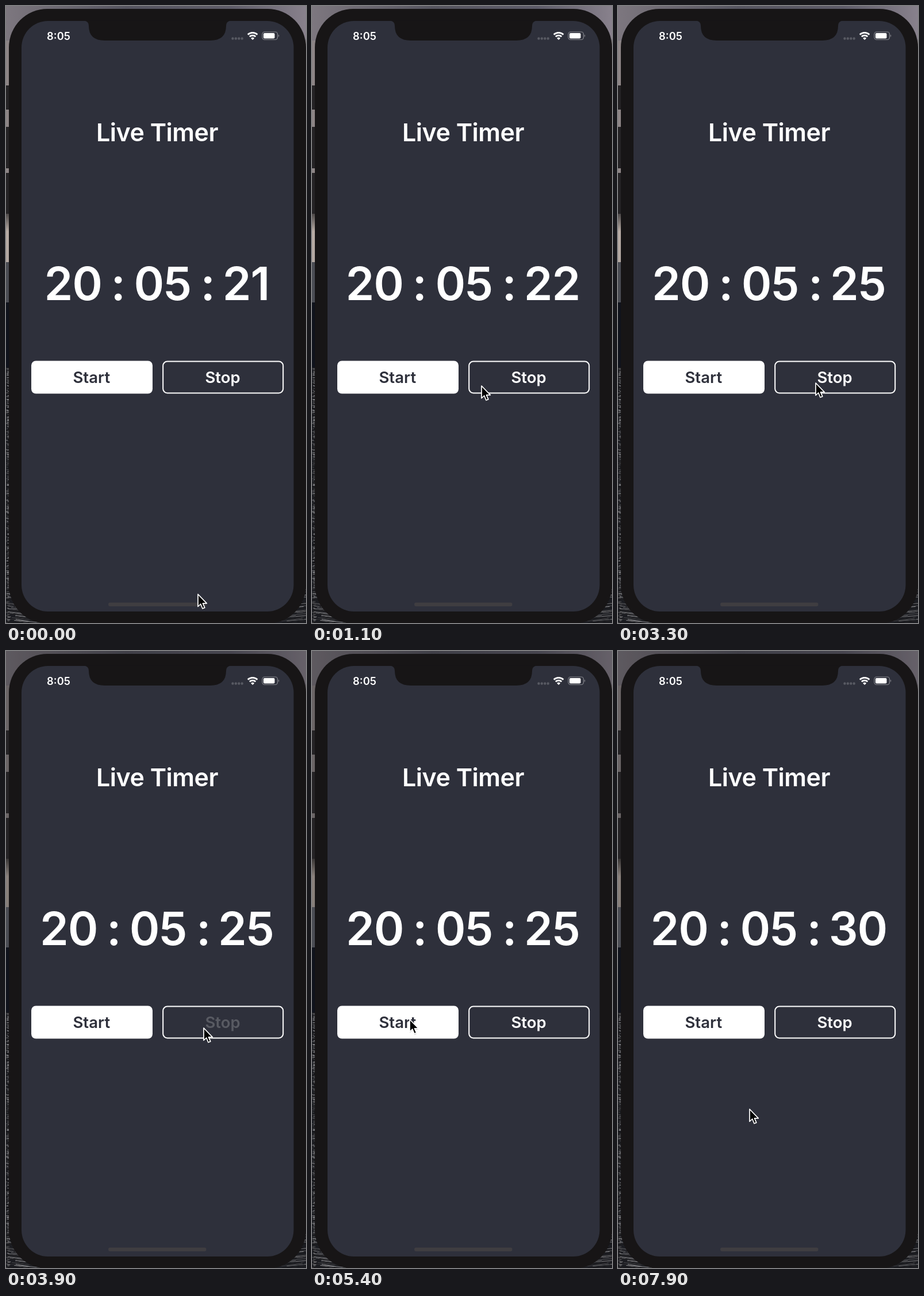
These frames come from a looping animation (522 by 1072 pixels, 8000 ms). An HTML page:

```html
<!DOCTYPE html>
<html lang="en">
<head>
<meta charset="utf-8">
<title>Live Timer</title>
<style>
  html, body { margin: 0; width: 100%; height: 100%; overflow: hidden; background: #171516; }
  svg { display: block; width: 522px; height: 1072px; }
  text { font-family: Inter, "Open Sans", sans-serif; font-weight: 600; fill: #fff; text-anchor: middle; }
</style>
</head>
<body>
<svg viewBox="0 0 522 1072">
  <defs>
    <linearGradient id="wall" x2="0" y2="1">
      <stop offset="0" stop-color="#7d777f"/>
      <stop offset=".15" stop-color="#8d8586"/>
      <stop offset=".8" stop-color="#8d8586"/>
      <stop offset=".81" stop-color="#4a4646"/>
      <stop offset=".88" stop-color="#b8aca5"/>
      <stop offset="1" stop-color="#b3a8a2"/>
    </linearGradient>
    <linearGradient id="top">
      <stop offset="0" stop-color="#7d777f"/>
      <stop offset=".4" stop-color="#55545f"/>
      <stop offset=".75" stop-color="#5d5b68"/>
      <stop offset="1" stop-color="#88818c"/>
    </linearGradient>
    <path id="arrow" d="M1 1V22.500L5.700 18L9 26L12.800 24.400L9.500 16.800H16.300Z"/>
  </defs>

  <!-- desktop behind the phone -->
  <rect width="522" height="445" fill="url(#wall)"/>
  <rect width="522" height="60" fill="url(#top)"/>
  <rect y="445" width="6" height="70" fill="#4a4c53"/>
  <rect y="515" width="6" height="113" fill="#10131c"/>
  <rect y="628" width="522" height="444" fill="#1b1c21"/>
  <g id="water"></g>
  <rect id="dim" width="522" height="445"/>
  <path d="M0 138h6v42H0zM0 210h6v72H0zM0 290h6v71H0z" fill="#252325"/>

  <!-- phone -->
  <rect x="5" y="5" width="517" height="1068" rx="67" fill="#171516"/>
  <rect x="27" y="26" width="473.500" height="1026" rx="46" fill="#2e303b"/>
  <path d="M136 25.500q8 1 8 9q0 25.500 28 25.500H355q28 0 28-25.500q0-8 8-9z" fill="#171516"/>
  <rect x="178" y="1036.500" width="170.500" height="6.500" rx="3.250" fill="#3f3d41"/>

  <!-- status bar -->
  <text x="91.500" y="58.500" font-size="18.300">8:05</text>
  <path d="M394.500 56.500h17" stroke="#585a63" stroke-width="4.400" stroke-linecap="round" stroke-dasharray="0 5.400"/>
  <g fill="none" stroke="#fff" stroke-width="2.800">
    <path d="M420.800 49.800a12 12 0 0 1 16.600 0M423.900 53.300a7.500 7.500 0 0 1 10.400 0"/>
    <path d="M429.100 59l-3-3.100a4.400 4.400 0 0 1 6 0z" fill="#fff" stroke="none"/>
  </g>
  <rect x="446" y="45" width="26.500" height="13.500" rx="4" fill="none" stroke="#85868d" stroke-width="1.200"/>
  <rect x="448" y="47" width="19.500" height="9.500" rx="2" fill="#fff"/>
  <path d="M474 49.500q2.500 2.200 0 4.500z" fill="#85868d"/>

  <text x="263" y="234.500" font-size="43" letter-spacing="-.5">Live Timer</text>
  <g font-size="80" letter-spacing="-1">
    <g id="lead">
      <text id="hours" x="46.500" y="511">20</text>
      <text x="124.500" y="511">:</text>
      <text x="202" y="511">05</text>
      <text x="280.500" y="511">:</text>
    </g>
    <text id="seconds" x="417.500" y="511"></text>
  </g>

  <rect x="44" y="616.500" width="211" height="57" rx="8" fill="#fff"/>
  <text id="start" x="148.800" y="655" font-size="27.500" style="fill:#2e303b">Start</text>
  <rect x="273.200" y="617.500" width="209" height="55" rx="7.500" fill="none" stroke="#fff" stroke-width="2"/>
  <text id="stop" x="377" y="655" font-size="27.500">Stop</text>

  <g id="cursor">
    <use href="#arrow" y="2" opacity=".2"/>
    <use href="#arrow" stroke="#fff" stroke-width="1.700" stroke-linejoin="round"/>
  </g>
</svg>
<script>
const LOOP = 8000, STEP = 100;
const STOP = 3900, RESTART = 6800;
const $ = id => document.getElementById(id);

const home = { x: 333, y: 1021 };
const moves = [
  { from: 100, to: 300, x: 330, y: 1010 },
  { from: 700, to: 1100, x: 294, y: 659 },
  { from: 2300, to: 2600, x: 343, y: 654 },
  { from: 4800, to: 5400, x: 169, y: 639 },
  { from: 7200, to: 7400, x: 228, y: 795 }
];

function cursorAt(t) {
  let { x, y } = home;
  for (const m of moves) {
    const p = Math.min(1, Math.max(0, (t - m.from) / (m.to - m.from)));
    const eased = p * p * (3 - 2 * p);
    x += (m.x - x) * eased;
    y += (m.y - y) * eased;
  }
  return `translate(${x} ${y})`;
}

// The clock ticks each second, holds after Stop and catches up on Start.
function secondAt(t) {
  return t < RESTART
    ? 21 + Math.floor((Math.min(t, STOP) + 700) / 1000)
    : 29 + Math.floor((t - RESTART) / 1000);
}

// A pressed label goes faint, then returns within 300 ms.
function labelOpacity(t, press, faint) {
  return t < press ? 1 : Math.min(1, Math.max(faint, (t - press) / 250 - .2));
}

function drawWater() {
  let seed = 7, lines = '';
  const rand = () => (seed = seed * 16807 % 2147483647) / 2147483647;
  const line = (x, y, dx, dy) => {
    const light = 20 + 120 * rand() ** 2;
    lines += `<path d="M${x} ${y}l${dx} ${dy}" stroke="rgb(${light},${light},${light + 3})"/>`;
  };
  for (let y = 628.5; y < 1072; y++) {
    line(rand() * 3, y, 2 + rand() * 4, 0);
    if (y > 1000) {
      line(rand() * 20, y, 20 + rand() * 30, 4);
      line(450 + rand() * 50, y, 20 + rand() * 50, -4);
    }
  }
  $('water').innerHTML = lines;
}

function draw(t) {
  $('seconds').textContent = secondAt(t);
  const slack = $('hours').getComputedTextLength() - $('seconds').getComputedTextLength();
  $('lead').setAttribute('transform', `translate(${60.8 + slack / 2} 0)`);
  $('stop').setAttribute('opacity', labelOpacity(t, STOP, .2));
  $('start').setAttribute('opacity', labelOpacity(t, RESTART, .35));
  $('dim').setAttribute('opacity', t < STOP ? 0 : .25);
  $('cursor').setAttribute('transform', cursorAt(t));
}

const begin = performance.now();
function tick() {
  const elapsed = (performance.now() - begin) % LOOP;
  draw(Math.floor(elapsed / STEP) * STEP);
  requestAnimationFrame(tick);
}

drawWater();
tick();
</script>
</body>
</html>
```
